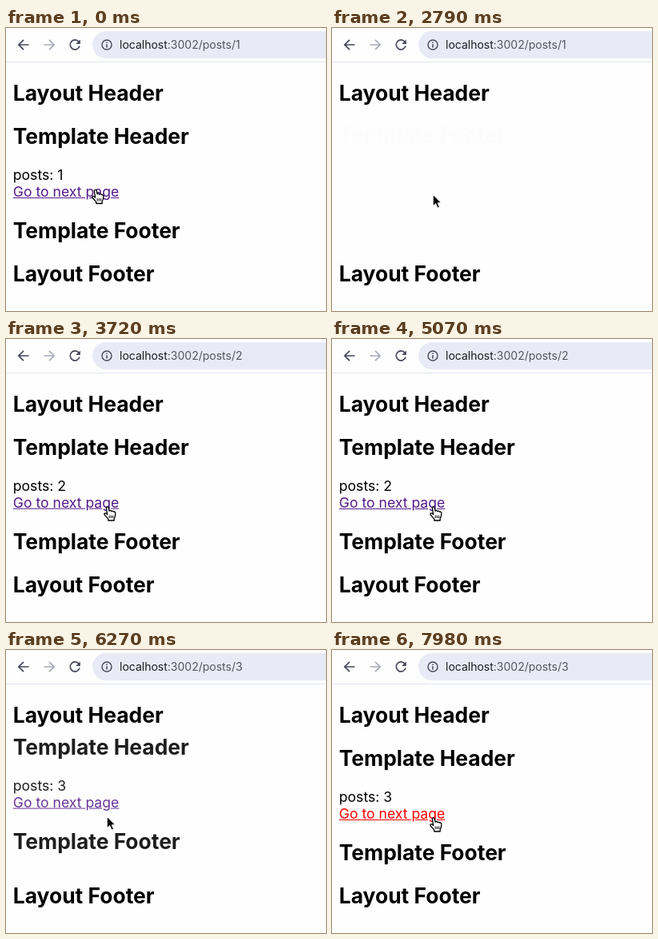
Write an HTML page that moves like this. It is 400 px wide and 354 px high and loops after 8 s.

```html
<!DOCTYPE html>
<html lang="en">
<head>
<meta charset="utf-8">
<title>Template transition</title>
<style>
  html, body { margin: 0; width: 100%; height: 100%; overflow: hidden; background: #fefefe; }
  body { position: relative; font: 17.6px/21.3px Inter, "Open Sans", sans-serif; color: #000; }
  #bar { position: absolute; inset: 0 0 auto; height: 42px; border-bottom: 1px solid #e2e4ee; }
  #pill { position: absolute; left: 108px; right: -40px; top: 4px; height: 34px; border-radius: 17px; background: #e8ebf5; }
  #url { position: absolute; left: 142px; top: 11px; font-size: 14px; line-height: 20px; color: #54565e; white-space: pre; }
  #url b { font-weight: 400; color: #1c1d22; }
  svg { position: absolute; left: 0; top: 0; overflow: visible; }
  #page { position: absolute; left: 0; top: 43px; width: 400px; height: 311px; overflow: hidden; }
  h2, p { position: absolute; left: 8.8px; margin: 0; white-space: nowrap; }
  h2 { font-size: 26.4px; line-height: 32px; font-weight: 700; }
  #tpl { position: absolute; inset: 0; }
  #link { color: #551a8b; text-decoration: underline; }
  #link.down { color: #f00; }
</style>
</head>
<body>
<div id="page">
  <h2 style="top:22px">Layout Header</h2>
  <div id="tpl">
    <h2 style="top:76px">Template Header</h2>
    <p style="top:130px">posts: <span id="num">1</span></p>
    <p style="top:151px"><span id="link">Go to next page</span></p>
    <h2 style="top:194px">Template Footer</h2>
  </div>
  <h2 style="top:248px">Layout Footer</h2>
</div>

<div id="bar">
  <div id="pill"></div>
  <svg width="140" height="42" fill="none" stroke-width="1.7">
    <path d="M28.5 21H16M22 14.8L15.8 21L22 27.2" stroke="#46475a"/>
    <path d="M47.5 21H60M54 14.8L60.2 21L54 27.2" stroke="#a8a9ba"/>
    <path d="M91 17.2A6 6 0 1 0 92 22.6" stroke="#46475a"/>
    <path d="M92.8 14.4V20H87.2Z" fill="#46475a"/>
    <circle cx="126" cy="21" r="6" stroke="#46475a" stroke-width="1.4"/>
    <path d="M126 20.2V24.4M126 17.4V19" stroke="#46475a" stroke-width="1.5"/>
  </svg>
  <div id="url"><b>localhost</b>:3002/posts/<span id="slug">1</span></div>
</div>

<svg id="cursor" width="20" height="22" stroke-linejoin="round">
  <path id="arrow" d="M-.8 -.8V14.2L2.7 10.9L5 16.3L7.6 15.2L5.3 9.9H10Z" fill="#000" stroke="#fff" stroke-width="1.1"/>
  <g id="hand" stroke="#000" stroke-width="1.3" fill="#fff">
    <path d="M-1.7 2.4C-1.7 .4 1.1 .4 1.3 2.2L2 6.2C2.5 5.1 4.4 5.2 4.7 6.6C5.5 5.7 7 6 7.3 7.2C8.6 6.6 9.7 7.4 9.8 8.9C9.9 12 9.4 13.6 8.2 15.4V18H.8V16.1L-3.8 11C-4.9 9.4-3.2 8.2-1.8 9.2L-.3 10.6Z"/>
    <path d="M2.2 11.6V15M4.4 11.6V15M6.6 11.6V15" fill="none" stroke-width="1"/>
  </g>
</svg>

<script>
const LOOP = 8000, ENTER = 980, DROP = 120, PRESS = 110, URL_LAG = 60;
const navs = [2790, 5630, 8000];
const $ = id => document.getElementById(id);
const [tpl, num, slug, link, cursor, arrow, hand] =
  ["tpl", "num", "slug", "link", "cursor", "arrow", "hand"].map($);

const clamp = v => Math.min(1, Math.max(0, v));
const easeOut = v => 1 - (1 - v) ** 2;
const pageAt = t => 1 + navs.filter(n => t >= n).length;
const show = (el, on) => { el.style.display = on ? "" : "none"; };

function draw(t) {
  const page = pageAt(t);
  const k = page > 1 ? easeOut(clamp((t - navs[page - 2]) / ENTER)) : 1;
  const y = -DROP * (1 - k);
  tpl.style.opacity = k;
  tpl.style.transform = k < 1 ? `translateY(${y}px)` : "none";
  num.textContent = page;
  slug.textContent = pageAt(t - URL_LAG);
  link.className = navs.some(n => t >= n - PRESS && t < n) ? "down" : "";

  // the pointer slides along the link once, then rests
  const m = clamp((t - 210) / 150);
  cursor.style.transform = `translate(${112 + 15 * m}px, ${201.5 + 7.5 * m}px)`;
  const over = y > -5;
  show(hand, over);
  show(arrow, !over);
}

const start = performance.now();
function tick(now) {
  draw(Math.max(0, now - start) % LOOP);
  requestAnimationFrame(tick);
}
draw(0);
requestAnimationFrame(tick);
</script>
</body>
</html>
```
